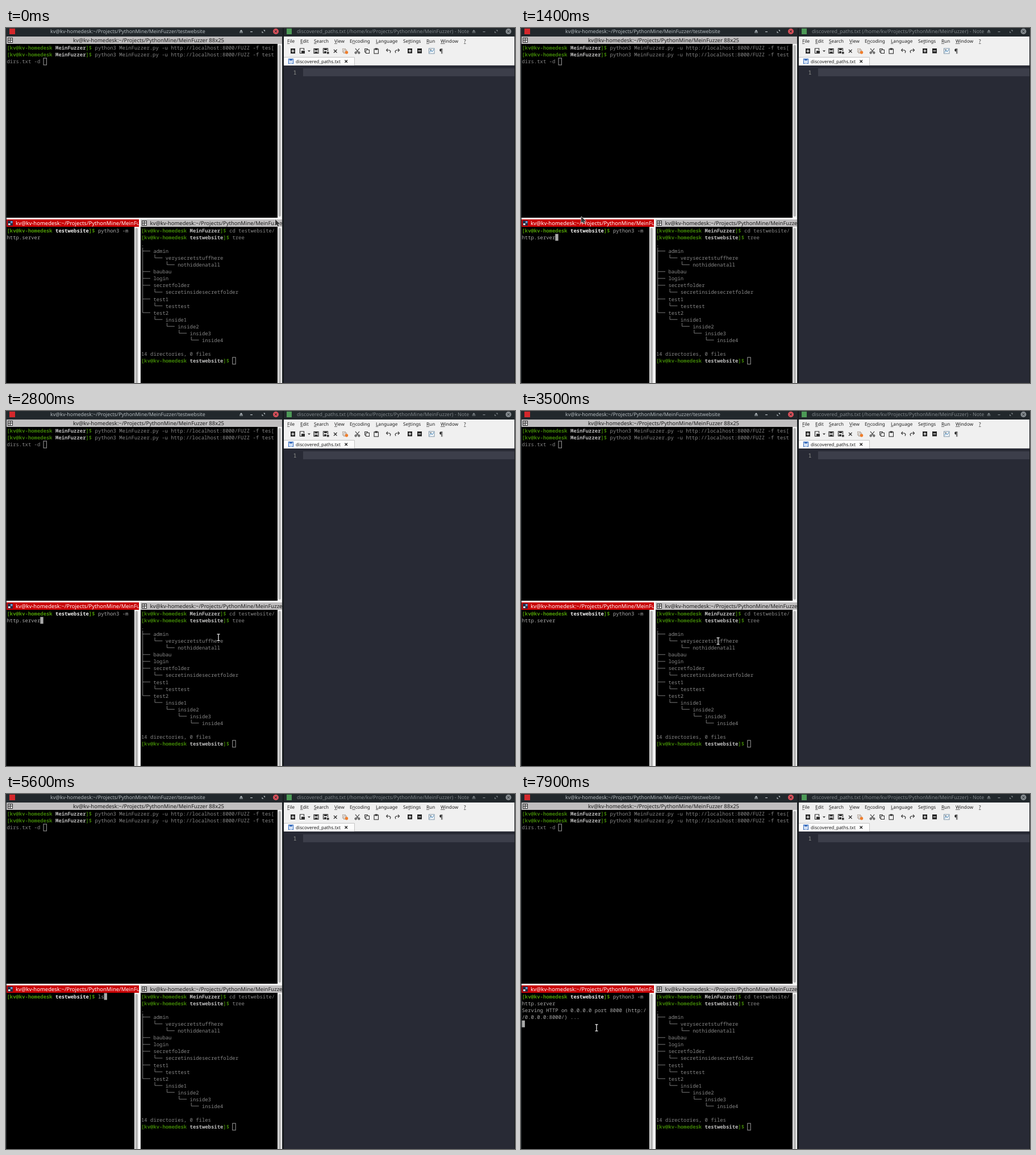
Write an HTML page with a canvas that moves like this. It is 896 px wide and 625 px high and loops after 8 s.

```html
<!DOCTYPE html>
<html lang="en">
<head>
<meta charset="utf-8">
<title>Terminal and editor</title>
<style>
html, body { margin: 0; width: 100%; height: 100%; overflow: hidden; background: #000; }
canvas { display: block; width: 100vw; height: 100vh; }
</style>
</head>
<body>
<canvas id="stage" width="896" height="625"></canvas>
<script>
const ctx = document.getElementById('stage').getContext('2d');
const LOOP = 8000, STEP = 100;
const SANS = '"Noto Sans", sans-serif';
const MONO = '"Noto Sans Mono", monospace';
const SIZE = 8.91, CELL = SIZE * 0.6, ROW = 12.05;
const USER = 'kv', HOST = USER + '@' + USER + '-homedesk';
const PROJECT = '/Projects/PythonMine/MeinFuzzer';
const SERVE = ['python3 -m', 'http.server'];

const DIM = { text: '#888888', green: '#3e8206', bold: '#bebebd' };
const LIT = { text: '#aaaaaa', green: '#4e9a06', bold: '#eeeeec' };

// Panes: origin of the first text row
const TOP = { x: 1.5, y: 28.5, ...DIM };
const LEFT = { x: 1.5, y: 350.5, ...LIT };
const RIGHT = { x: 238, y: 350.5, ...DIM };

const TREE = [
  [0, 'admin'], [1, 'verysecretstuffhere'], [2, 'nothiddenatall'],
  [0, 'baubau'], [0, 'login'],
  [0, 'secretfolder'], [1, 'secretinsidesecretfolder'],
  [0, 'test1'], [1, 'testtest'],
  [0, 'test2'], [1, 'inside1'], [2, 'inside2'], [3, 'inside3'], [4, 'inside4']
];

// label, x, underlined letter
const MENU = [
  ['File', 495, 0], ['Edit', 518, 0], ['Search', 542, 0], ['View', 578, 0],
  ['Encoding', 605, 1], ['Language', 651, 0], ['Settings', 699, 2],
  ['Run', 740, 0], ['Window', 765, 0], ['?', 806, 0]
];

// Pointer path: time, x, y
const PATH = [
  [100, 478, 343], [300, 370, 358], [400, 260, 370], [600, 153, 380], [800, 153, 380],
  [1000, 80, 352], [1200, 22, 326], [1400, 110, 338], [1600, 186, 360],
  [1800, 285, 385], [2000, 337, 418], [2200, 400, 422], [2400, 396, 408], [2700, 396, 408],
  [3000, 330, 380], [3200, 300, 384], [3500, 347, 405], [3600, 350, 403],
  [3800, 300, 440], [4100, 300, 490], [4300, 330, 532], [4500, 363, 561],
  [4600, 374, 561], [4700, 405, 564], [4900, 330, 420], [5100, 200, 294],
  [5300, 133, 427], [5600, 133, 427]
];

// Spans in which the block cursor of the focused pane is lit
const BLINK = [[200, 800], [1400, 2000], [2800, 3400], [4000, 4600], [5200, 6100], [6700, LOOP]];

function rect(x, y, w, h, color) {
  ctx.fillStyle = color;
  ctx.fillRect(x, y, w, h);
}

function frame(x, y, w, h, color, width = 1) {
  ctx.strokeStyle = color;
  ctx.lineWidth = width;
  ctx.strokeRect(x, y, w, h);
}

function line(points, color, width = 1) {
  ctx.strokeStyle = color;
  ctx.lineWidth = width;
  ctx.beginPath();
  for (let i = 0; i < points.length; i += 2) ctx.lineTo(points[i], points[i + 1]);
  ctx.stroke();
}

function poly(points, color) {
  ctx.fillStyle = color;
  ctx.beginPath();
  for (let i = 0; i < points.length; i += 2) ctx.lineTo(points[i], points[i + 1]);
  ctx.fill();
}

function disc(x, y, r, color) {
  ctx.fillStyle = color;
  ctx.beginPath();
  ctx.arc(x, y, r, 0, 7);
  ctx.fill();
}

// Laid out at ten times the size to keep fractional advances
function text(str, x, y, size, color, family = SANS, weight = 400) {
  ctx.save();
  ctx.translate(x, y);
  ctx.scale(0.1, 0.1);
  ctx.font = `${weight} ${size * 10}px ${family}`;
  ctx.textRendering = 'geometricPrecision';
  ctx.fillStyle = color;
  ctx.fillText(str, 0, 0);
  ctx.restore();
}

function clip(x, y, w, h, draw) {
  ctx.save();
  ctx.beginPath();
  ctx.rect(x, y, w, h);
  ctx.clip();
  draw();
  ctx.restore();
}

function put(pane, col, row, str, color = pane.text, weight = 400) {
  text(str, pane.x + col * CELL, pane.y + row * ROW + 9.5, SIZE, color, MONO, weight);
}

function prompt(pane, row, dir, command) {
  const head = '[' + HOST, end = head.length + 1 + dir.length;
  put(pane, 0, row, head, pane.green, 700);
  put(pane, head.length + 1, row, dir, pane.bold, 700);
  put(pane, end, row, ']$', pane.green, 700);
  put(pane, end + 3, row, command);
}

function block(col, row) {
  rect(LEFT.x + col * CELL, LEFT.y + row * ROW, CELL, 12, LIT.text);
}

function hollow(pane, col, row) {
  frame(pane.x + col * CELL + 0.4, pane.y + row * ROW + 0.4, CELL, 12, '#a0a0a0');
}

function windowButtons(x, color, closeColor) {
  poly([x - 3, 6.5, x, 3, x + 3, 6.5], color);
  rect(x - 3, 7.5, 6, 1, color);
  rect(x + 16, 6, 4, 1.2, color);
  poly([x + 39, 3.5, x + 42, 3.5, x + 42, 6.5], color);
  poly([x + 36.5, 5.5, x + 36.5, 8.5, x + 39.5, 8.5], color);
  disc(x + 61, 6, 5, closeColor);
  line([x + 59, 4, x + 63, 8], '#22282c');
  line([x + 63, 4, x + 59, 8], '#22282c');
}

function tileIcon(x, y) {
  frame(x + 0.5, y + 0.5, 8, 8, '#333333');
  line([x + 4.5, y, x + 4.5, y + 9], '#333333');
  line([x, y + 4.5, x + 9, y + 4.5], '#333333');
  rect(x + 5, y + 5, 3, 3, '#e6e6e6');
}

function scrollbar(x, y, h, thumb) {
  rect(x, y, 8, h, '#f2f2f2');
  ctx.fillStyle = '#b6b6b6';
  ctx.beginPath();
  ctx.roundRect(x + 1.5, y + 2, 4.5, thumb, 2);
  ctx.fill();
}

function drawTerminals() {
  rect(0, 0, 487, 625, '#22282c');
  rect(6, 1, 10, 10, '#d5282c');
  text(`${HOST}:~${PROJECT}/testwebsite`, 78, 9.2, 8.87, '#b6bdc1');
  windowButtons(414, '#b6bdc1', '#d9505a');

  rect(1, 15, 485, 13, '#c0bebf');
  tileIcon(3, 17);
  text(`${HOST}:~${PROJECT} 88x25`, 118, 24.9, 9.48, '#1c1c1c');
  rect(1, 28, 477, 306, '#000');
  scrollbar(478, 28, 306, 302);
  rect(1, 334, 485, 3, '#f6f6f6');

  rect(1, 337, 233, 13, '#c80003');
  rect(3, 339, 9, 9, '#272c44');
  rect(4, 344, 3.5, 3, '#e8e8e8');
  rect(8, 340, 3.5, 3.5, '#6c9bd0');
  clip(1, 337, 233, 13, () => text(`${HOST}:~${PROJECT}`, 17, 346.9, 9.48, '#fff'));
  rect(1, 350, 225, 275, '#000');
  scrollbar(226, 350, 275, 280);
  rect(234, 337, 3, 288, '#f6f6f6');

  rect(237, 337, 249, 13, '#c0bebf');
  tileIcon(239, 339);
  clip(237, 337, 249, 13, () => text(`${HOST}:~${PROJECT}`, 253.5, 346.9, 9.48, '#1c1c1c'));
  rect(237, 350, 241, 275, '#000');
  scrollbar(478, 350, 275, 280);

  const fuzz = 'python3 MeinFuzzer.py -u http://localhost:8000/FUZZ -f ';
  prompt(TOP, 0, 'MeinFuzzer', fuzz + 'tes[');
  prompt(TOP, 1, 'MeinFuzzer', fuzz + 'test');
  put(TOP, 0, 2, 'dirs.txt -d');
  hollow(TOP, 12, 2);

  prompt(RIGHT, 0, 'MeinFuzzer', 'cd testwebsite/');
  prompt(RIGHT, 1, 'testwebsite', 'tree');
  put(RIGHT, 0, 2, '.');
  drawTree(3);
  put(RIGHT, 0, 18, '14 directories, 0 files');
  prompt(RIGHT, 19, 'testwebsite', '');
  hollow(RIGHT, 30, 19);
}

function drawTree(first) {
  const left = col => RIGHT.x + col * CELL;
  const top = row => RIGHT.y + row * ROW;
  const lastRoot = first + TREE.findIndex(([, name]) => name === 'test2');
  line([left(0.5), top(first), left(0.5), top(lastRoot + 0.5)], DIM.text, 0.9);
  TREE.forEach(([depth, name], i) => {
    const row = first + i, col = depth * 4;
    const x = left(col + 0.5), y = top(row + 0.5);
    line([x, y, left(col + 3), y], DIM.text, 0.9);
    if (depth) line([x, top(row), x, y], DIM.text, 0.9);
    put(RIGHT, col + 4, row, name);
  });
}

function disk(x, y, color) {
  frame(x - 4, y - 4, 8, 8, color, 1.2);
  rect(x - 2.5, y - 4, 5, 3, color);
  rect(x - 2.5, y + 1, 5, 3, color);
}

function zoomIcon(x, plus) {
  rect(x - 4, 36, 8, 8.5, '#262626');
  rect(x - 2.5, 39.7, 5, 1.2, '#fff');
  if (plus) rect(x - 0.6, 37.8, 1.2, 5, '#fff');
}

function turnArrow(x, dir) {
  line([x + 3 * dir, 44, x + 4 * dir, 41, x + 2 * dir, 39, x - 3 * dir, 39], '#333333', 1.1);
  line([x - dir, 36.5, x - 3.5 * dir, 39, x - dir, 41.5], '#333333', 1.1);
}

function drawToolbar() {
  const ink = '#2e2e2e';
  rect(501, 36, 8, 9, ink);
  rect(502.5, 40, 5, 1.2, '#fff');
  rect(504.4, 38, 1.2, 5, '#fff');

  line([521, 44.5, 517.5, 44.5, 517.5, 36, 524.5, 36, 524.5, 39], ink, 1.2);
  rect(520, 40, 6, 5, ink);
  poly([531, 39.5, 536, 39.5, 533.5, 42], ink);
  disk(546, 40.5, ink);
  disk(562.5, 40, ink);
  rect(564, 41, 5, 5, '#f0f0f0');
  rect(565, 42, 3.5, 3.5, ink);
  line([577, 38, 582.5, 43.5], ink, 1.2);
  line([582.5, 38, 577, 43.5], ink, 1.2);

  frame(592.5, 36.5, 5, 6, '#b5a89d');
  frame(594.5, 38.5, 5, 6, '#b5a89d');
  disc(599.5, 43, 2.7, '#ef7d2b');

  line([615, 36, 620.5, 43], ink, 1.1);
  line([622, 36, 616.5, 43], ink, 1.1);
  for (const x of [615.7, 621.3]) {
    ctx.beginPath();
    ctx.arc(x, 43.6, 1.5, 0, 7);
    ctx.stroke();
  }
  line([633, 42.5, 631.5, 42.5, 631.5, 36.5, 636.5, 36.5, 636.5, 38], ink);
  frame(633.5, 38.5, 6, 6, ink);
  frame(648, 37, 7.5, 8, ink, 1.1);
  rect(649.5, 35.5, 4.5, 3, ink);
  turnArrow(673, 1);
  turnArrow(689, -1);
  zoomIcon(711, true);
  zoomIcon(728, false);

  rect(744, 35.5, 10.5, 10, '#f6f8fa');
  frame(744.5, 36, 9.5, 9, '#7890a4');
  line([746, 43, 748, 39, 750, 42, 753, 37.5], '#4284b8');
  rect(746, 37.8, 3, 1, '#555555');
  text('¶', 762.8, 44, 10, ink, SANS, 700);
}

function drawEditor() {
  rect(487, 0, 409, 625, '#16191c');
  rect(489, 0, 407, 15, '#22282c');
  rect(494, 1, 9, 10, '#4d9a57');
  clip(489, 0, 326, 15, () =>
    text(`discovered_paths.txt (/home/${USER}${PROJECT}) - Note`, 512, 9.2, 8.9, '#7f8589'));
  windowButtons(823.5, '#7f8589', '#858b8f');

  rect(489, 15, 406, 51, '#f0f0f0');
  for (const [label, x, at] of MENU) {
    text(label, x, 25.6, 8.22, '#202020');
    ctx.font = '82.2px ' + SANS;
    const from = ctx.measureText(label.slice(0, at)).width / 10;
    const width = ctx.measureText(label[at]).width / 10;
    rect(x + from, 27, width, 0.8, '#444444');
  }
  drawToolbar();

  line([613, 65.5, 895, 65.5], '#d4d4d4');
  rect(489, 51, 124, 15, '#fcfcfc');
  line([489, 51.5, 613.5, 51.5, 613.5, 66], '#c4c4c4');
  disk(501.5, 58.5, '#3a6fc0');
  rect(499, 59.5, 5, 3, '#d7e5f7');
  text('discovered_paths.txt', 510, 62, 8.17, '#1c1c1c');
  line([596.5, 56.5, 601, 61], '#222222', 1.2);
  line([601, 56.5, 596.5, 61], '#222222', 1.2);

  rect(489, 66, 406, 559, '#282a35');
  rect(523, 71, 372, 14, '#3c3e4a');
  text('1', 505.5, 82, 10.2, '#90918d', MONO);
}

function drawShell(t) {
  const lit = BLINK.some(([on, off]) => t >= on && t < off);
  if (t >= 5500 && t < 7000) {
    prompt(LEFT, 0, 'testwebsite', 'ls');
    if (lit) block(32, 0);
    return;
  }
  prompt(LEFT, 0, 'testwebsite', SERVE[0]);
  put(LEFT, 0, 1, SERVE[1]);
  if (t < 7400) {
    if (lit) block(SERVE[1].length, 1);
  } else if (t < 7500) {
    block(0, 2);
  } else {
    put(LEFT, 0, 2, 'Serving HTTP on 0.0.0.0 port 8000 (http:/');
    put(LEFT, 0, 3, '/0.0.0.0:8000/) ...');
    block(0, 4);
  }
}

function pointerAt(t) {
  if (t >= 7900) return [133, 411.5];
  if (t >= 5600) return null;
  if (t <= PATH[0][0]) return PATH[0].slice(1);
  const i = PATH.findIndex(p => p[0] > t);
  const [t0, x0, y0] = PATH[i - 1], [t1, x1, y1] = PATH[i];
  const k = (t - t0) / (t1 - t0);
  return [x0 + (x1 - x0) * k, y0 + (y1 - y0) * k];
}

function drawPointer(t) {
  const spot = pointerAt(t);
  if (!spot) return;
  const [x, y] = spot;
  if (y > 334 && y < 350) {
    const shape = [-4, -6, -4, 5, -1.5, 3, 0.5, 6.5, 2.3, 5.5, 0.6, 2.2, 4.2, 2];
    const points = shape.map((v, i) => v + (i % 2 ? y : x));
    line([...points, points[0], points[1]], '#e8e8e8', 1.2);
    poly(points, '#3a3a3a');
    return;
  }
  for (const [color, width] of [['#000', 3], ['#e8e8e8', 1.3]]) {
    line([x, y - 5.5, x, y + 5.5], color, width);
    line([x - 2.5, y - 5.7, x + 2.5, y - 5.7], color, width);
    line([x - 2.5, y + 5.7, x + 2.5, y + 5.7], color, width);
  }
}

function render(now) {
  const t = Math.floor((now % LOOP) / STEP) * STEP;
  drawTerminals();
  drawEditor();
  drawShell(t);
  drawPointer(t);
}

const start = performance.now();
function tick() {
  render(performance.now() - start);
  requestAnimationFrame(tick);
}
tick();
</script>
</body>
</html>
```
